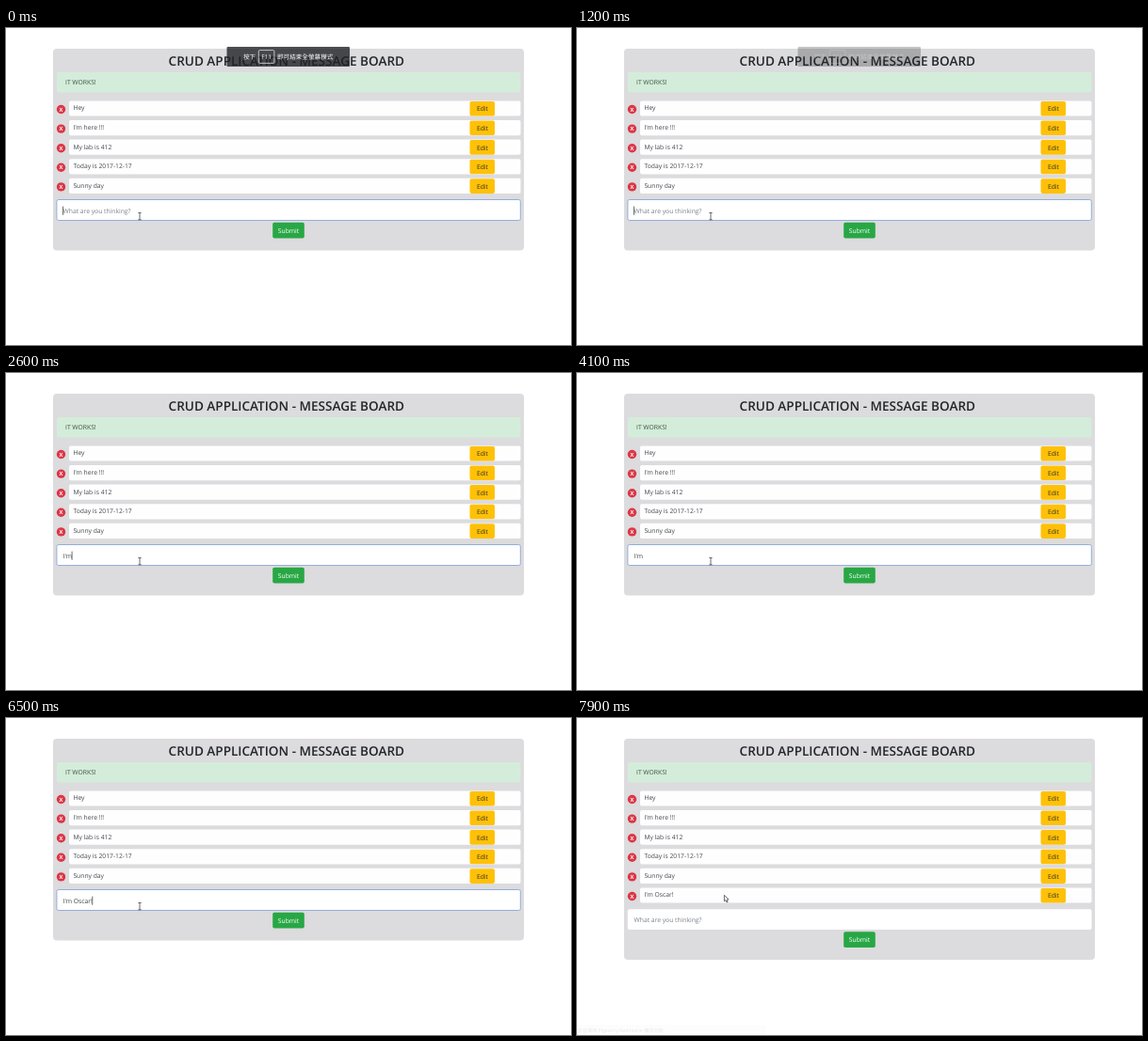
An HTML page with a canvas that plays this animation: 600 by 337 pixels, repeating every 8 s.

```html
<!DOCTYPE html>
<html lang="en">
<head>
<meta charset="utf-8">
<title>Message board</title>
<style>
html, body { margin: 0; width: 100%; height: 100%; overflow: hidden; background: #fff; }
canvas { display: block; width: 600px; height: 337px; }
</style>
</head>
<body>
<canvas id="stage"></canvas>
<script>
const W = 600, H = 337, LOOP = 8000, STEP = 100;
const ROW = 20.6, SENT = 7700;
const LATIN = '"Open Sans", "Noto Sans", sans-serif';
const CJK = '"Noto Sans CJK TC", "Noto Sans CJK", "Noto Sans CJK JP", sans-serif';
const messages = ["Hey", "I'm here !!!", "My lab is 412", "Today is 2017-12-17", "Sunny day"];
const reply = "I'm Oscar!";
// time of each key press and the number of characters typed by then
const keys = [[-130, 0], [1600, 1], [2000, 2], [2400, 3], [3050, 4], [5500, 5],
  [5600, 6], [5700, 8], [5900, 9], [6300, 10]];

const canvas = document.getElementById("stage");
const ctx = canvas.getContext("2d");
const dpr = window.devicePixelRatio || 1;
canvas.width = W * dpr;
canvas.height = H * dpr;
ctx.scale(dpr, dpr);
ctx.textRendering = "geometricPrecision";

const clamp = v => Math.max(0, Math.min(1, v));

function box(x, y, w, h, r, fill, stroke) {
  ctx.beginPath();
  ctx.roundRect(x, y, w, h, r);
  if (fill) {
    ctx.fillStyle = fill;
    ctx.fill();
  }
  if (stroke) {
    ctx.strokeStyle = stroke;
    ctx.stroke();
  }
}

function text(str, x, y, color, { size = 6.75, weight = 400, align = "left", font = LATIN } = {}) {
  ctx.font = `${weight} ${size}px ${font}`;
  ctx.textAlign = align;
  ctx.fillStyle = color;
  ctx.fillText(str, x, y);
  return ctx.measureText(str).width;
}

function drawRow(str, i) {
  const y = 77.4 + i * ROW;
  box(67, y, 479.5, 16.2, 1.8, "#fefefe");
  text(str, 71.4, y + 10, "#43474b");
  box(492.5, y + 0.5, 26.5, 15.6, 1.8, "#ffc107");
  text("Edit", 505.9, y + 11, "#332e20", { align: "center" });
  ctx.beginPath();
  ctx.arc(58.5, y + 9.1, 4.7, 0, Math.PI * 2);
  ctx.fillStyle = "#dc3545";
  ctx.fill();
  text("X", 58.5, y + 11.2, "#fff", { size: 5.8, weight: 700, align: "center" });
}

function drawInput(t, dy) {
  const focused = t < SENT;
  ctx.lineWidth = 1;
  if (focused) box(53.9, 182.5, 492.4, 22, 1.8, "#fff", "#93aedb");
  else box(53.8, 182.7 + dy, 492.7, 21.8, 1.8, "#fff");

  const key = keys.filter(k => k[0] <= t).pop();
  const typed = focused ? reply.slice(0, key[1]) : "";
  const y = 196.7 + dy;
  let end = 60.5;
  if (typed) end += text(typed, end, y, "#3d4247");
  else text("What are you thinking?", end, y, "#7a8188");

  const half = key[1] ? 350 : 530;
  if (focused && Math.floor((t - key[0]) / half) % 2 === 0) {
    ctx.fillStyle = "#4a4a4a";
    ctx.fillRect(end - 0.3, 189.6, 0.8, 9.2);
  }
}

function drawBoard(t) {
  const rows = t < SENT ? messages : messages.concat(reply);
  const dy = (rows.length - 5) * ROW;
  box(50, 22, 500, 214.4 + dy, 4, "#dcdbdd");
  text("CRUD APPLICATION - MESSAGE BOARD", 297.8, 40, "#212529",
    { size: 13.55, weight: 600, align: "center" });
  box(54, 47, 492.4, 21.4, 1.8, "#d4edda");
  text("IT WORKS!", 63, 60.2, "#38543f");
  rows.forEach(drawRow);
  drawInput(t, dy);
  box(283.2, 206.7 + dy, 33.6, 16.8, 1.8, "#28a745");
  text("Submit", 300, 217.6 + dy, "#fff", { align: "center" });
}

function drawHint(t) {
  const alpha = 1 - clamp((t - 600) / 900);
  if (!alpha) return;
  ctx.globalAlpha = alpha;
  box(234.5, 20, 130.5, 21, 1, "rgba(32,34,38,0.8)");
  const style = { size: 6.6, font: CJK };
  text("按下", 252, 33, "#fff", style);
  ctx.lineWidth = 0.8;
  box(268.3, 23.6, 16.6, 13.8, 1.2, null, "#e4e4e4");
  text("F11", 276.6, 33, "#fff", { size: 6.6, align: "center" });
  text("即可結束全螢幕模式", 288, 33, "#fff", style);
  ctx.globalAlpha = 1;
}

function drawStatus(t) {
  const alpha = Math.min(clamp((t - 6800) / 200), 1 - clamp((t - 7600) / 350));
  if (!alpha) return;
  ctx.globalAlpha = alpha;
  ctx.lineWidth = 0.6;
  box(-2, 327.3, 202, 12, 1.5, "#f1f1f1", "#dcdcdc");
  const style = { size: 5.1, font: CJK };
  let x = 1;
  x += text("正在等待 ", x, 334, "#5c5c5c", style);
  x += text("Pigeonry Redirector ", x, 334, "#5c5c5c", { size: 5.2 });
  text("擴充功能...", x, 334, "#5c5c5c", style);
  ctx.globalAlpha = 1;
}

function drawPointer(t) {
  ctx.strokeStyle = "#444";
  ctx.lineWidth = 0.8;
  ctx.beginPath();
  if (t < SENT) {
    ctx.moveTo(140.4, 196.5);
    ctx.lineTo(143.6, 196.5);
    ctx.moveTo(142, 196.5);
    ctx.lineTo(142, 203.8);
    ctx.moveTo(140.4, 203.8);
    ctx.lineTo(143.6, 203.8);
    ctx.stroke();
    return;
  }
  const p = clamp((t - SENT + 100) / 300);
  ctx.save();
  ctx.translate(142 + 14.4 * p, 199 - 10.7 * p);
  [[0, 0], [0, 6.6], [1.5, 5.3], [2.6, 7.7], [3.7, 7.2], [2.7, 4.9], [4.6, 4.7]]
    .forEach(([x, y]) => ctx.lineTo(x, y));
  ctx.closePath();
  ctx.fillStyle = "#fff";
  ctx.fill();
  ctx.stroke();
  ctx.restore();
}

function draw(now) {
  const t = Math.floor((now % LOOP) / STEP) * STEP;
  ctx.fillStyle = "#fff";
  ctx.fillRect(0, 0, W, H);
  drawBoard(t);
  drawHint(t);
  drawStatus(t);
  drawPointer(t);
}

const start = performance.now();
function tick() {
  draw(performance.now() - start);
  requestAnimationFrame(tick);
}
tick();
</script>
</body>
</html>
```
